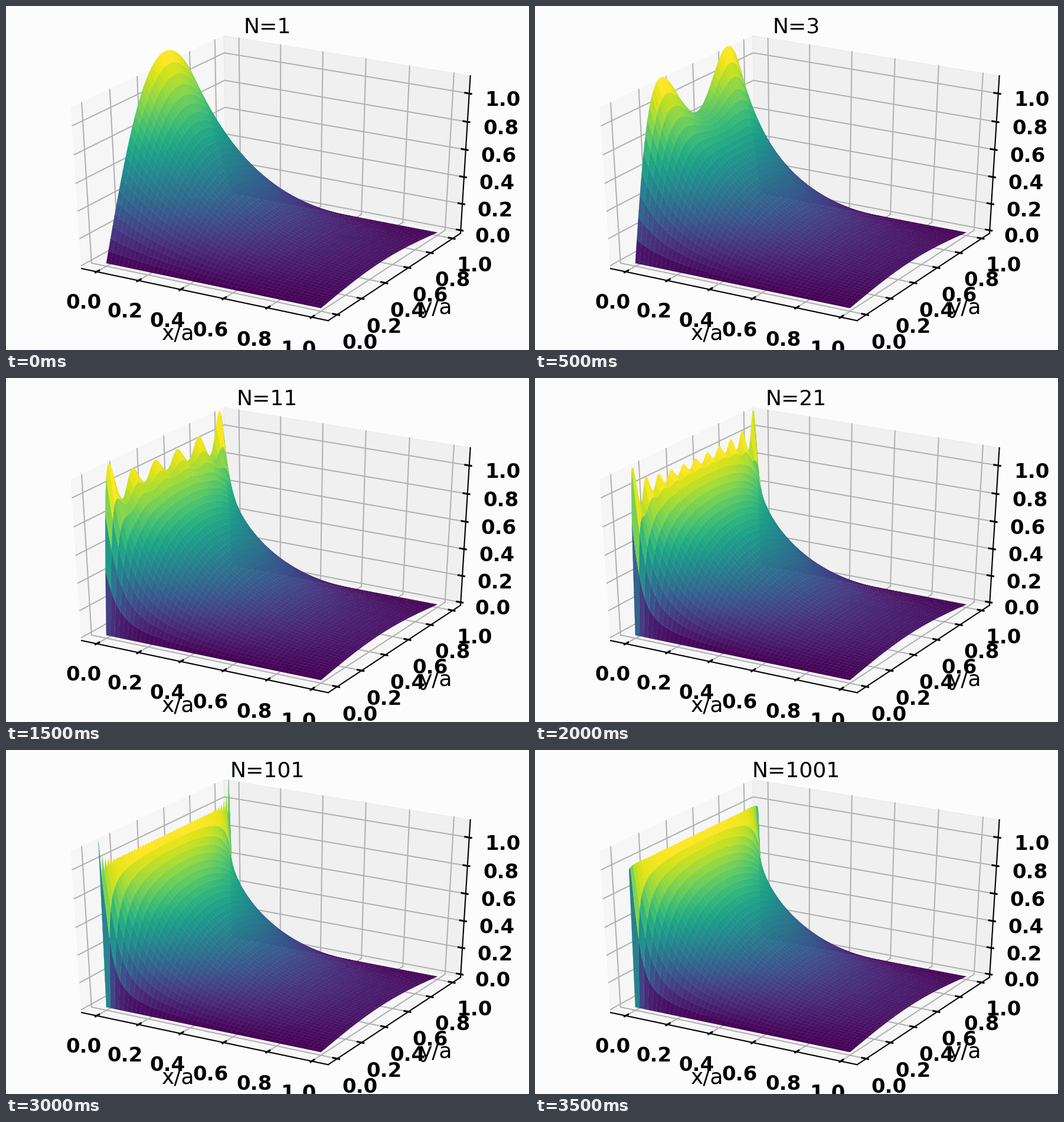
A matplotlib script for the animation above (4000 ms loop, 886 px wide and 582 px high).

```python
import numpy as np
import matplotlib.pyplot as plt
from matplotlib.animation import FuncAnimation
from matplotlib.collections import LineCollection, PolyCollection

W, H, DPI = 886, 582, 64
PX = 72 / DPI                  # points per pixel
LEFT, BOTTOM = 14.7, 566.2     # plot area corner and size
PLOT_W, PLOT_H = 856, 552
EDGE = 0.5 + 1 / 48            # half size of the drawn box
ORDERS = [1, 3, 5, 11, 21, 51, 101, 1001]
TICKS = np.arange(6) / 5

ELEV, AZIM, DIST = np.radians(30), np.radians(-60), 10
RIGHT = np.array([-np.sin(AZIM), np.cos(AZIM), 0])
EYE = np.array([np.cos(ELEV) * np.cos(AZIM),
                np.cos(ELEV) * np.sin(AZIM), np.sin(ELEV)])
UP = np.cross(EYE, RIGHT)


def project(points):
    """Box coordinates (centre 0, side 1) to pixels and nearness."""
    points = np.asarray(points, float)
    near = points @ EYE
    depth = DIST - near
    x = LEFT + (points @ RIGHT / depth + 0.095) / 0.185 * PLOT_W
    y = BOTTOM - (points @ UP / depth + 0.095) / 0.185 * PLOT_H
    return np.stack([x, y], axis=-1), near


def box_xy(v):
    return (v + 0.05) / 1.1 - 0.5


def box_z(v):
    return v / 1.1 - 0.5


fig = plt.figure(figsize=(W / DPI, H / DPI), dpi=DPI, facecolor="#fcfcfc")
ax = fig.add_axes([0, 0, 1, 1])
ax.set_xlim(0, W)
ax.set_ylim(H, 0)
ax.axis("off")


def add_pane(corners, grey, alpha):
    ax.add_patch(plt.Polygon(project(corners)[0], facecolor=str(grey),
                             edgecolor=str(grey), alpha=alpha,
                             linewidth=1.4 * PX, zorder=1))


def add_lines(paths, color, width, zorder):
    ax.add_collection(LineCollection(
        [project(p)[0] for p in paths], colors=color, linewidths=width * PX,
        capstyle="projecting", zorder=zorder))


def draw_box():
    e = EDGE
    add_pane([(-e, -e, -e), (-e, e, -e), (-e, e, e), (-e, -e, e)], 0.95, 0.5)
    add_pane([(-e, e, -e), (e, e, -e), (e, e, e), (-e, e, e)], 0.9, 0.5)
    add_pane([(-e, -e, -e), (e, -e, -e), (e, e, -e), (-e, e, -e)], 0.925, 0.3)

    grid, marks = [], []
    out, inner = 0.1 / 12, 0.2 / 12
    far, far_z = e + 0.094, e + 0.0915
    for t in TICKS:
        a, c = box_xy(t), box_z(t)
        grid += [[(a, -e, -e), (a, e, -e), (a, e, e)],
                 [(e, a, -e), (-e, a, -e), (-e, a, e)],
                 [(-e, -e, c), (-e, e, c), (e, e, c)]]
        marks += [[(a, -e - out, -e), (a, -e + inner, -e)],
                  [(e + out, a, -e), (e - inner, a, -e)],
                  [(e + out, e, c), (e - inner, e, c)]]
        for spot in [(a, -far, -far), (far, a, -far), (far_z, far_z, c)]:
            x, y = project(spot)[0]
            ax.text(x, y, f"{t:.1f}", ha="center", va="top", weight="bold",
                    size=34 * PX, zorder=4)
    add_lines(grid, "#b0b0b0", 2.0, 2)
    add_lines([[(-e, -e, -e), (e, -e, -e)], [(e, -e, -e), (e, e, -e)],
               [(e, e, -e), (e, e, e)]], "black", 2.1, 3)
    add_lines(marks, "black", 3, 3)

    far = e + 0.168
    for name, spot in [("x/a", (0, -far, -far)), ("y/a", (far, 0, -far))]:
        x, y = project(spot)[0]
        ax.text(x, y, name, ha="center", va="center", size=36.1 * PX, zorder=4)


draw_box()
title = ax.text(442.2, 46, "", ha="center", va="baseline",
                size=36.1 * PX, zorder=6)
surface = PolyCollection([], linewidths=0.3 * PX, zorder=5)
ax.add_collection(surface)

# Grid of 100 x 100 samples, drawn as cells two samples wide
COUNT = 100
axis = np.linspace(0, 1, COUNT)
X, Y = np.meshgrid(axis, axis)
STOPS = list(range(0, COUNT - 1, 2)) + [COUNT - 1]


def cell_outlines():
    index = np.arange(COUNT * COUNT).reshape(COUNT, COUNT)
    cells = []
    for r0, r1 in zip(STOPS, STOPS[1:]):
        for c0, c1 in zip(STOPS, STOPS[1:]):
            cells.append(np.concatenate([
                index[r0, c0:c1], index[r0:r1, c1],
                index[r1, c1:c0:-1], index[r1:r0:-1, c0]]))
    return cells


CELLS = cell_outlines()


def potential(order):
    """Fourier series of the slot potential with odd terms up to order."""
    n = np.arange(1, order + 1, 2)
    modes = np.sin(np.pi * np.outer(axis, n)) / n
    decay = np.exp(-np.pi * np.outer(n, axis))
    return 4 / np.pi * modes @ decay


def update(i):
    order = ORDERS[i]
    z = potential(order)
    points = np.stack([box_xy(X), box_xy(Y), box_z(z)], axis=-1).reshape(-1, 3)
    pixels, near = project(points)
    height = np.array([z.ravel()[c].mean() for c in CELLS])
    rank = np.argsort([near[c].mean() for c in CELLS], kind="stable")
    shade = (height - height.min()) / (height.max() - height.min())
    surface.set_verts([pixels[CELLS[k]] for k in rank])
    # Thin edges in the face colour soften the seams between cells
    surface.set_color(plt.cm.viridis(shade[rank]))
    title.set_text(f"N={order}")
    return surface, title


anim = FuncAnimation(fig, update, frames=len(ORDERS), interval=500,
                     init_func=lambda: update(0), repeat=True, repeat_delay=0)
plt.show()
```
